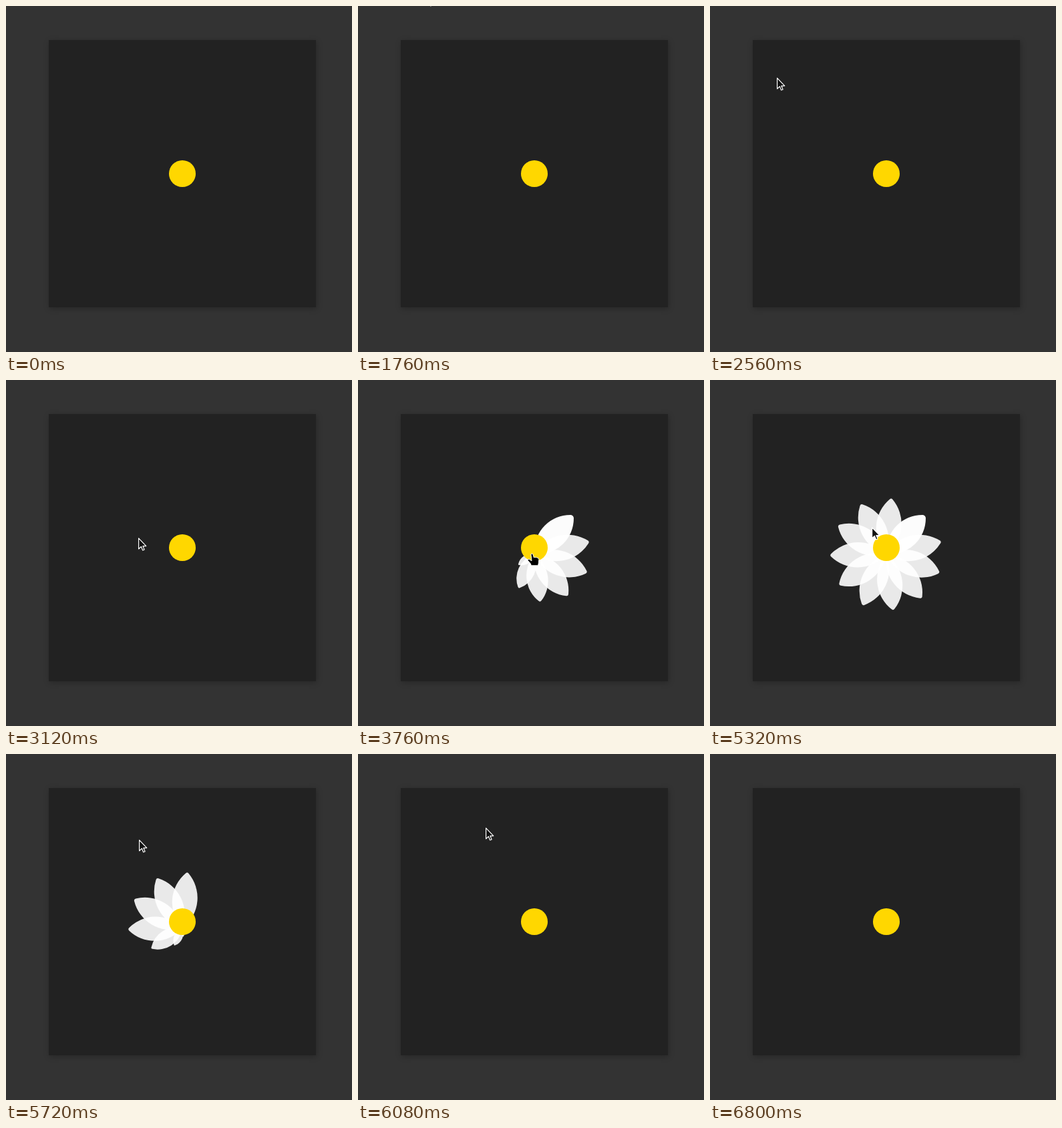
An HTML page that plays this animation: 518 by 518 pixels, repeating every 7840 ms.

```html
<!DOCTYPE html>
<html lang="en">
<head>
<meta charset="utf-8">
<title>Flower</title>
<style>
  html, body { margin: 0; width: 100%; height: 100%; overflow: hidden; background: #333; }
  #panel {
    position: absolute; left: 64px; top: 51px; width: 400px; height: 400px;
    background: #222; box-shadow: 1px 2px 8px rgba(0, 0, 0, .25);
  }
  .petal {
    position: absolute; left: 200px; top: 150px; width: 60px; height: 60px;
    border-radius: 57px 3px; background: #fff; opacity: .9;
    transform-origin: 0 100%; transform: scale(0);
  }
  .petal:first-child { top: 151px; width: 59px; height: 59px; border-radius: 54px 5px; opacity: .99; }
  #disc {
    position: absolute; left: 180px; top: 180px; width: 40px; height: 40px;
    border-radius: 50%; background: #ffd700;
  }
  #cursor { position: absolute; left: 0; top: 0; width: 1px; height: 1px; overflow: visible; }
  #cursor path { stroke: #fff; stroke-linejoin: round; }
</style>
</head>
<body>
<div id="panel"><div id="petals"></div><div id="disc"></div></div>
<svg id="cursor">
  <path id="arrow" fill="#111" stroke-width="1.2" d="M.6 .9V17L4.4 13.4L6.7 19L9.1 18L6.9 12.6H11.8Z"/>
  <path id="hand" fill="#000" stroke-width="1" transform="translate(.4 .8)" d="M-1.5 1.2Q0 -.8 1.5 1L3 6Q4.8 4.6 5.8 6Q7.6 5.2 8.6 6.8Q10.6 6.6 10.5 8.8L10 14L9.2 18H-1L-2.2 15L-6.4 10.2Q-6.6 8.2 -4.2 8.4L-.4 11Z"/>
</svg>
<script>
const LOOP = 7840, STEP = 40;
const COUNT = 11, TURN = 32, GAP = 50, GROW = 300;
const ENTER = 3344, LEAVE = 5304;

// Pointer moves: start time, end time, target and sideways bend
const home = { x: 101, y: -20 };
const moves = [
  { from: 1700, to: 2240, x: 100, y: 107, bend: -18 },
  { from: 2520, to: 3480, x: 260, y: 259, bend: 34 },
  { from: 5040, to: 5760, x: 199, y: 128, bend: 0 },
  { from: 5800, to: 6080, x: 191, y: 110, bend: 0 },
  { from: 6280, to: 6800, x: 88, y: -26, bend: 0 }
];

const $ = id => document.getElementById(id);
const clamp = v => Math.min(1, Math.max(0, v));
const glide = u => u * u * u * (u * (6 * u - 15) + 10);

const petals = Array.from({ length: COUNT }, () => {
  const el = document.createElement('div');
  el.className = 'petal';
  return $('petals').appendChild(el);
});

// The CSS "ease" curve
function ease(x) {
  if (x <= 0) return 0;
  if (x >= 1) return 1;
  let lo = 0, hi = 1, u = .5;
  for (let i = 0; i < 24; i++) {
    u = (lo + hi) / 2;
    const bx = .75 * u * (1 - u) + u ** 3;
    if (bx < x) lo = u; else hi = u;
  }
  return .3 * u * (1 - u) ** 2 + 3 * u * u * (1 - u) + u ** 3;
}

function pointer(t) {
  let { x, y } = home;
  for (const m of moves) {
    if (t < m.from) break;
    const f = glide(clamp((t - m.from) / (m.to - m.from)));
    const dx = m.x - x, dy = m.y - y;
    const side = m.bend * Math.sin(Math.PI * f) / Math.hypot(dx, dy);
    x += dx * f - dy * side;
    y += dy * f + dx * side;
  }
  return [Math.round(x), Math.round(y)];
}

function draw(t) {
  petals.forEach((el, k) => {
    const wait = (k + 1) * GAP;
    const size = ease((t - ENTER - wait) / GROW) - ease((t - LEAVE - wait) / GROW);
    el.style.transform = `rotate(${k * TURN}deg) scale(${size.toFixed(4)})`;
  });
  const over = t >= ENTER && t < LEAVE;
  $('hand').style.display = over ? '' : 'none';
  $('arrow').style.display = over ? 'none' : '';
  const [x, y] = pointer(t);
  $('cursor').style.transform = `translate(${x}px, ${y}px)`;
}

const start = performance.now();
function tick() {
  const t = (performance.now() - start) % LOOP;
  draw(Math.floor(t / STEP) * STEP);
  requestAnimationFrame(tick);
}
tick();
</script>
</body>
</html>
```
